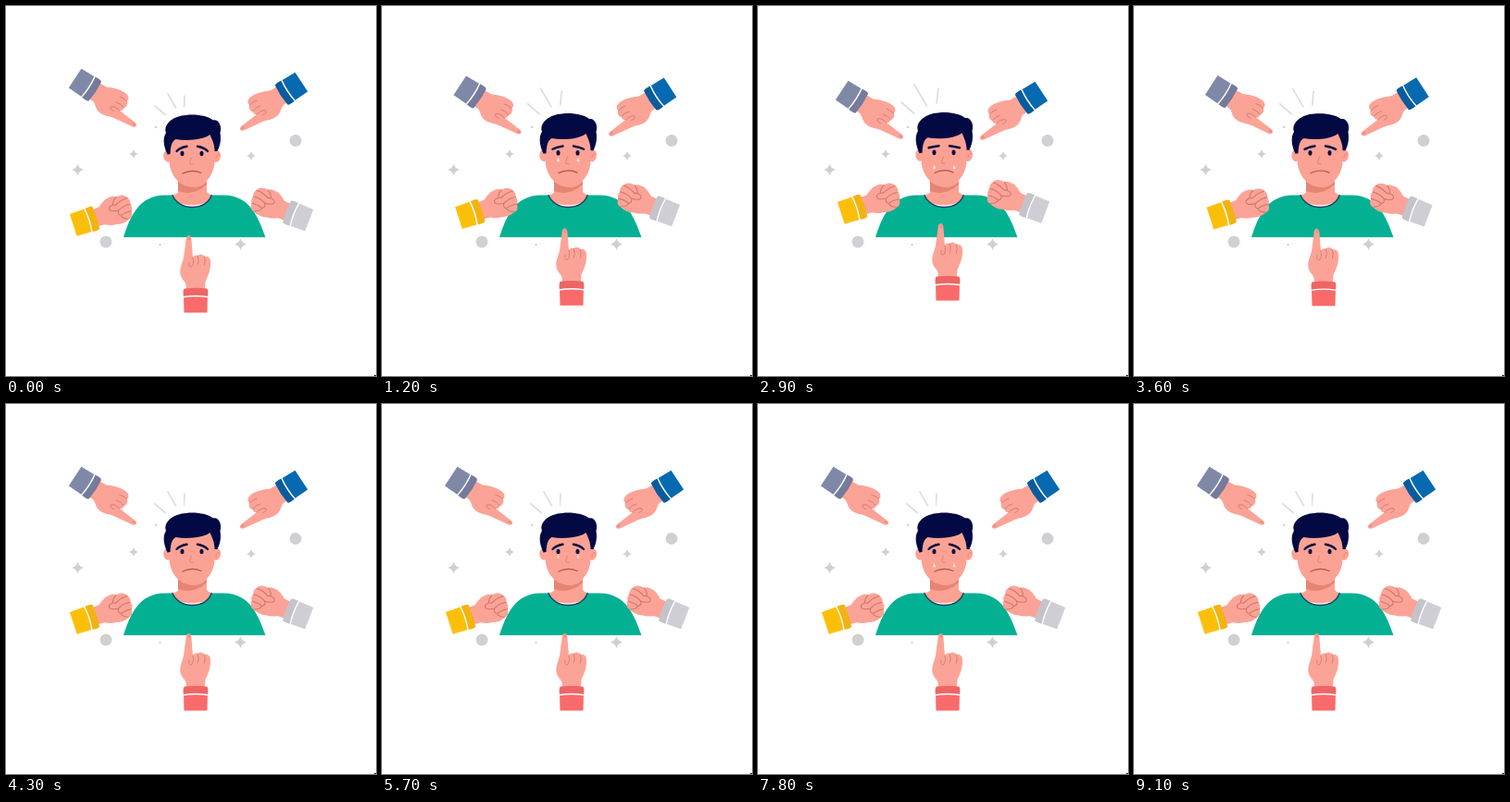
Animation, 400 px wide and 400 px high, one loop 9600 ms. Source, as an HTML page with a canvas:

```html
<!DOCTYPE html>
<html lang="en">
<head>
<meta charset="utf-8">
<title>Blamed</title>
<style>
  html, body { margin: 0; width: 100%; height: 100%; overflow: hidden; background: #fff; }
  canvas { display: block; width: 100vw; height: 100vh; }
</style>
</head>
<body>
<canvas id="stage"></canvas>
<script>
const LOOP = 9600, STEP = 100, TEAR_CYCLE = 4800;
const SKIN = '#fca397', CREASE = '#d0766f', FACE = '#fca294', SHADE = '#e58475';
const NAVY = '#030a43', GREEN = '#04b092', PALE = '#d1cfd5';

const canvas = document.getElementById('stage');
const ctx = canvas.getContext('2d');
const ratio = window.devicePixelRatio || 1;
canvas.width = canvas.height = 400 * ratio;

const clamp = v => Math.max(0, Math.min(1, v));
const mix = (a, b, k) => a + (b - a) * k;
const ramp = (t, from, to) => (1 - Math.cos(Math.PI * clamp((t - from) / (to - from)))) / 2;

function fill(d, color) {
  ctx.fillStyle = color;
  ctx.fill(new Path2D(d));
}

function stroke(d, color, width) {
  ctx.strokeStyle = color;
  ctx.lineWidth = width;
  ctx.stroke(new Path2D(d));
}

function oval(x, y, rx, ry, color, turn = 0) {
  ctx.beginPath();
  ctx.ellipse(x, y, rx, ry, turn, 0, Math.PI * 2);
  ctx.fillStyle = color;
  ctx.fill();
}

function sparkle(x, y, r) {
  const q = r * 0.2;
  fill(`M${x} ${y - r}Q${x + q} ${y - q} ${x + r} ${y}Q${x + q} ${y + q} ${x} ${y + r}` +
    `Q${x - q} ${y + q} ${x - r} ${y}Q${x - q} ${y - q} ${x} ${y - r}Z`, PALE);
}

function scenery() {
  sparkle(77.5, 177, 6.5);
  sparkle(138, 160, 5);
  sparkle(265, 162, 5);
  sparkle(253.5, 257.5, 6.5);
  oval(313, 145.5, 6.5, 6.5, PALE);
  oval(108, 255, 6.5, 6.5, PALE);
  oval(162, 131, 1.2, 1.2, PALE);
  oval(166.5, 258, 1.2, 1.2, PALE);
  ctx.fillStyle = '#222';
  ctx.fillRect(398, 399, 2, 1);
}

// Three strokes above the head, longer and further out while p grows.
function alarm(p) {
  const rays = [
    [161, 108, 172, 117.5, -6, -4, -3, -1],
    [175, 95, 183.5, 110, -6, -10, -1, -2],
    [193, 97, 192.5, 109, 2, -8, 0.5, -4]
  ];
  for (const [x1, y1, x2, y2, a, b, c, d] of rays) {
    stroke(`M${x1 + a * p} ${y1 + b * p}L${x2 + c * p} ${y2 + d * p}`, '#dfdde2', 1.7);
  }
}

function body() {
  const collar = 'M180 204.5C183 212 191 217.5 201 217.5C212 217.5 220 212 222 204.5';
  fill('M186 180L217 180L217 201L222 205C220 219 182 219 180 205L186 202Z', FACE);
  fill('M186 186Q202 204 217 190L217 193Q203 206 186 200Z', SHADE);
  fill(collar + 'L235 204.5C264 204.5 273 229 280.5 250L127 250C134 229 143 204.5 172 204.5Z', GREEN);
  stroke(collar, '#1d4368', 1.4);
}

function hair() {
  fill('M174.5 160.5C170.5 152 169 143 173 137C169.5 128 181 118.5 195 118' +
    'C205 116.5 219 119 224 123.5C230 122 234 131 231.5 137C233 146 231 152 228.5 157' +
    'L225.5 157C225.5 149 223 145 220.5 139C215 144 197 146.5 183.5 144' +
    'C178.5 147 178 153 177.5 160Z', NAVY);
}

function head(p, tear) {
  ctx.save();
  ctx.translate(0, 200);
  ctx.scale(1, 1 + 0.03 * p);
  ctx.translate(0, -200);
  oval(174.5, 162.5, 4.2, 6.2, FACE, -0.15);
  oval(227.5, 162.5, 4.5, 6.5, FACE, 0.15);
  stroke('M227 165Q227.5 160 230 160.5', SHADE, 0.9);
  fill('M176 137L226 137L225.500 168C225 185 213 195.500 201 195.500' +
    'C188 195.500 177.500 184 176.500 168Z', FACE);
  hair();
  const inner = mix(151.8, 152.6, p), outer = mix(157, 154.6, p);
  stroke(`M184.5 ${outer}Q188.5 ${inner + 1} 195.5 ${inner}`, NAVY, 2.4);
  stroke(`M207 ${inner}Q214 ${inner + 1} 218 ${outer}`, NAVY, 2.4);
  oval(190.500, 159.500, 2, 2.800, NAVY);
  oval(211.500, 159.500, 2, 2.800, NAVY);
  stroke('M200.5 164L198.5 170Q199.500 171.500 202 171', SHADE, 1);
  stroke('M191 181Q201 176 211 180.5', '#b0534b', 1.2);
  ctx.restore();
  if (tear) {
    ctx.globalAlpha = tear.alpha;
    for (const x of [190.500, 212]) {
      fill(`M${x} ${tear.y - 2.8}Q${x + 2.6} ${tear.y + 2} ${x} ${tear.y + 2}` +
        `Q${x - 2.6} ${tear.y + 2} ${x} ${tear.y - 2.8}Z`, '#fbeef3');
    }
    ctx.globalAlpha = 1;
  }
}

// Sleeve and hands lie along +x, with the wrist at the origin.
function sleeve(color, cuff) {
  fill('M-25.500 -12.500L-7 -13L-7 13L-25.500 12.500Z', color);
  fill('M-8 -13.200Q0 -14 0.500 -12Q2 0 0.500 12Q0 14 -8 13.200Q-6.500 0 -8 -13.200Z', cuff);
  stroke('M-8.500 -12.800Q-6.500 0 -8.500 12.800', '#fff', 1.4);
}

function pointing() {
  fill('M-1 -10L8 -10.500C15 -14 23 -17 31 -16C35 -15 36 -12 35 -10' +
    'C38 -8 38.500 -4 36 -2C37 0 36 2.500 34 3L55 4.700Q58.500 5.500 57.800 8Q57 10.300 53 10.400' +
    'L34 13C27 14.500 23 17.500 16 16.500C11 15.500 9 12 5 10.500L-1 10Z', SKIN);
  stroke('M35 -9.500Q30 -11 26 -9.500M36 -2.200Q31 -4 26 -2.500' +
    'M34 3Q27 1.500 24 4.500Q23 8 29 7', CREASE, 0.8);
  oval(55, 7, 2.200, 1.300, '#f08e85', 0.1);
}

function fist() {
  fill('M-1 -9.500L7 -10C11 -13 15 -16.500 20 -16.500C24 -17 27 -16 28 -14.500' +
    'C33 -16 38 -14 39 -10.500C41.500 -8 41.500 -5 40 -2.500C41.500 0 41 3.500 39 5' +
    'C39 9 38 12 34 12.500C29 15 23 15 19 13.500C14 13.500 10 11.500 7 10L-1 9.500Z', SKIN);
  stroke('M28 -14.500Q23 -12 22 -8M39 -10Q31 -10 25 -6.500M40 -2.500Q32 -3.500 26 0' +
    'M39 5Q32 4 27 6M25 -6.500C20 -9 14 -6 18 -2Q22 0 26 0Q23 4 27 6Q27 10 33 12', CREASE, 1.1);
}

const arms = [
  { at: [96, 92], shift: [16, 13], turn: 33, side: 1, hand: pointing, cloth: '#8088a8', cuff: '#747b9b' },
  { at: [298, 96], shift: [-13, 10], turn: 33, side: -1, hand: pointing, cloth: '#0769b0', cuff: '#075c9d' },
  { at: [205, 306], shift: [0, -13], turn: -90, side: 1, flip: -1, hand: pointing, cloth: '#f96b6b', cuff: '#ee6565' },
  { at: [97, 229], shift: [17, -13], turn: -18, side: 1, hand: fist, cloth: '#fcbf09', cuff: '#f2b312' },
  { at: [304, 222.5], shift: [-17, -8.500], turn: -21, side: -1, hand: fist, cloth: '#cfced5', cuff: '#c4c3ca' }
];

function arm({ at, shift, turn, side, flip = 1, hand, cloth, cuff }, p) {
  ctx.save();
  ctx.translate(at[0] + shift[0] * p, at[1] + shift[1] * p);
  ctx.scale(side, 1);
  ctx.rotate(turn * Math.PI / 180);
  ctx.scale(1, flip);
  hand();
  sleeve(cloth, cuff);
  ctx.restore();
}

function tearAt(t) {
  const u = t % TEAR_CYCLE;
  if (u < 700 || u > 3500) return null;
  return {
    y: mix(165, 174.500, clamp((u - 900) / 2000)),
    alpha: Math.min(clamp((u - 600) / 500), clamp((3500 - u) / 400)) * 0.9
  };
}

function draw(t) {
  const p = ramp(t, 750, 1550) * (1 - ramp(t, 3050, 4250));
  ctx.setTransform(canvas.width / 400, 0, 0, canvas.height / 400, 0, 0);
  ctx.fillStyle = '#fff';
  ctx.fillRect(0, 0, 400, 400);
  ctx.lineCap = ctx.lineJoin = 'round';
  scenery();
  alarm(p);
  body();
  head(p, tearAt(t));
  for (const a of arms) arm(a, p);
}

const start = performance.now();
function tick() {
  const t = (performance.now() - start) % LOOP;
  draw(Math.floor(t / STEP) * STEP);
  requestAnimationFrame(tick);
}
tick();
</script>
</body>
</html>
```
